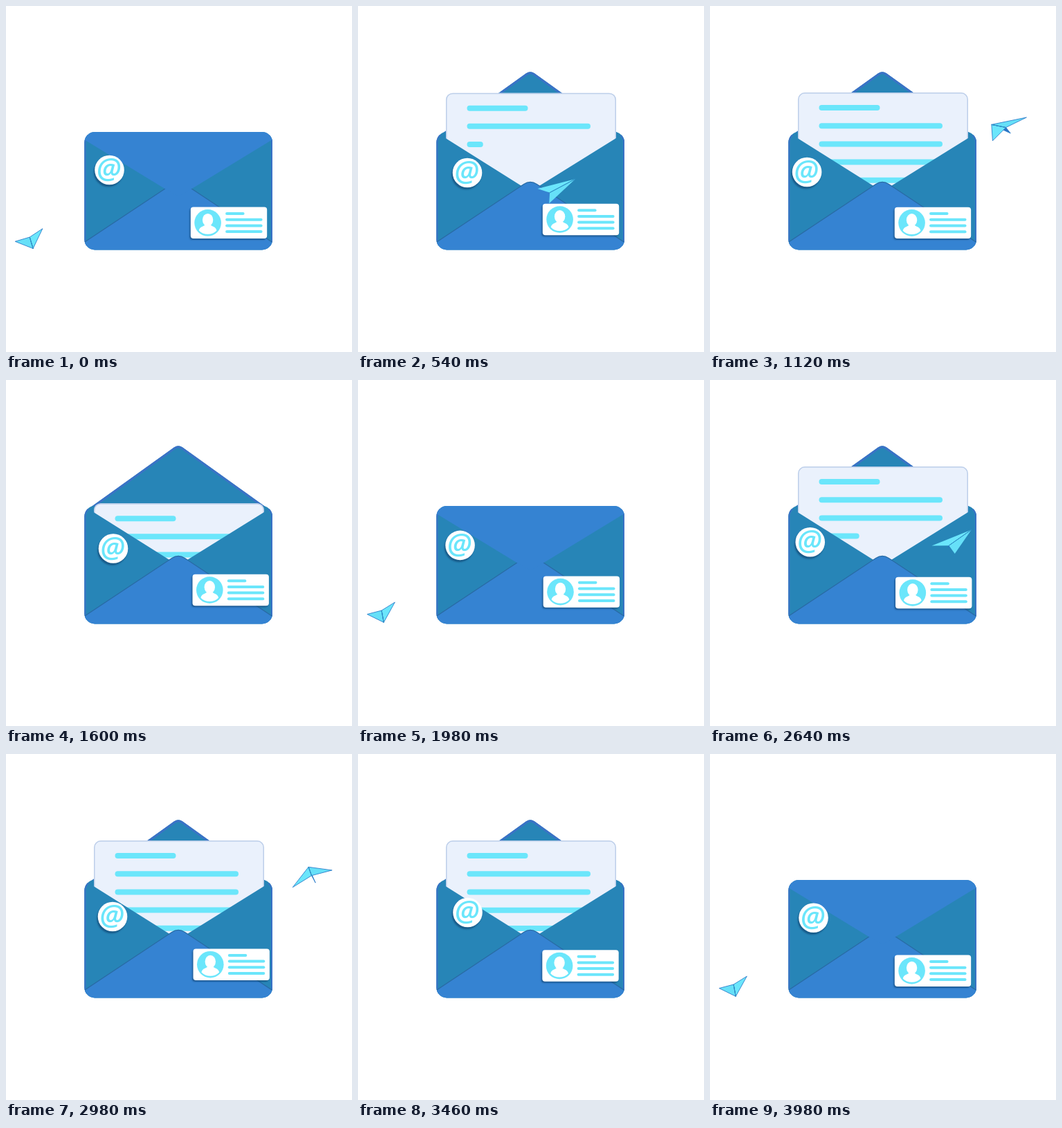
Animation of 500x500 px, one loop 4 s. Source, as an HTML page with a canvas:

```html
<!DOCTYPE html>
<html lang="en">
<head>
<meta charset="utf-8">
<title>Mail</title>
<style>
  html, body { margin: 0; width: 100%; height: 100%; overflow: hidden; background: #fff; }
  canvas { display: block; width: 100vw; height: 100vh; }
</style>
</head>
<body>
<canvas id="stage" width="500" height="500"></canvas>
<script>
const ctx = document.getElementById('stage').getContext('2d');
const LOOP = 4000, CYCLE = 2000;
const BLUE = '#3583d2', EDGE = '#3a72c6', TEAL = '#2785b7', CYAN = '#6be6fb';
const PAPER = '#eaf1fc', SHADE = 'rgba(15,65,110,0.6)';

// Drift of the stickers: time, badge x, y, card x, y
const drift = [
  [0, 149.5, 237, 322, 313.3],
  [540, 158, 241, 322, 308.5],
  [1140, 140, 240, 322, 313.3],
  [1600, 155, 243.5, 324.7, 303.5],
  [2360, 140, 234, 321.3, 309.5],
  [2980, 154, 235, 325.7, 304.2],
  [3460, 158.5, 229, 321.5, 306]
];

const clamp = v => Math.max(0, Math.min(1, v));
const span = (t, a, d) => clamp((t - a) / d);

// Smooth looping curve through the keys
function track(keys, t, period) {
  const n = keys.length;
  const at = i => {
    const turn = Math.floor(i / n), k = keys[i - turn * n];
    return { t: k[0] + turn * period, v: k };
  };
  let i = n - 1;
  while (keys[i][0] > t) i--;
  const [p, a, b, q] = [at(i - 1), at(i), at(i + 1), at(i + 2)];
  const d = b.t - a.t, u = (t - a.t) / d, u2 = u * u, u3 = u2 * u;
  return a.v.slice(1).map((x, j) => {
    const y = b.v[j + 1];
    const m = (y - p.v[j + 1]) / (b.t - p.t) * d;
    const k = (q.v[j + 1] - x) / (q.t - a.t) * d;
    return x * (2 * u3 - 3 * u2 + 1) + m * (u3 - 2 * u2 + u) + y * (3 * u2 - 2 * u3) + k * (u3 - u2);
  });
}

function trace(...pts) {
  pts.forEach(([x, y], i) => i ? ctx.lineTo(x, y) : ctx.moveTo(x, y));
  ctx.closePath();
}

function fill(color) {
  ctx.fillStyle = color;
  ctx.fill();
}

function stroke(color, width) {
  ctx.strokeStyle = color;
  ctx.lineWidth = width;
  ctx.stroke();
}

function box(x, y, w, h, r) {
  ctx.beginPath();
  ctx.roundRect(x, y, w, h, r);
}

function bar(x, y, len, thick) {
  box(x, y - thick / 2, len, thick, thick / 2);
  fill(CYAN);
}

function shadow(dx, dy, blur) {
  ctx.shadowColor = SHADE;
  ctx.shadowOffsetX = dx;
  ctx.shadowOffsetY = dy;
  ctx.shadowBlur = blur;
}

// Triangle with a rounded peak at x = 249
function peak(base, top, half, round) {
  const slope = (base - top) / half;
  ctx.beginPath();
  ctx.moveTo(249 - half, base);
  ctx.lineTo(249 - round, top + slope * round);
  ctx.quadraticCurveTo(249, top, 249 + round, top + slope * round);
  ctx.lineTo(249 + half, base);
}

const bodyPath = () => box(113.4, 182, 271.6, 170.5, 15);

function openFlap(s) {
  ctx.save();
  peak(188, 188 - 95 * s, 132.5, 6);
  ctx.closePath();
  fill(TEAL);
  ctx.clip();
  stroke(EDGE, 6);
  ctx.restore();
}

function closedFlap(s) {
  ctx.save();
  bodyPath();
  ctx.clip();
  peak(188 + 5 * s, 188 + 88 * s, 136, 6);
  ctx.lineTo(385, 182);
  ctx.lineTo(113, 182);
  fill(BLUE);
  ctx.restore();
}

function paper(t) {
  const drop = t < 1000
    ? 140 * (1 - span(t, 236, 364)) ** 3
    : 140 * span(t, 1440, 221) ** 3;
  const y = 125 + drop;
  if (y > 262) return;
  ctx.save();
  box(127, y, 246, 340 - y, [10, 10, 0, 0]);
  fill(PAPER);
  ctx.clip();
  stroke('#bccee9', 3);
  for (let i = 0; i < 5; i++) {
    const w = (i ? 178.5 : 88) * span(t, 364 + 82 * i, 92);
    if (w > 0) bar(157.5, y + 22 + 26.2 * i, Math.max(8, w), 8);
  }
  ctx.restore();
}

function front() {
  ctx.save();
  bodyPath();
  ctx.clip();
  ctx.save();
  ctx.beginPath();
  trace([113, 182.4], [249, 268], [113, 348]);
  trace([385, 183.4], [249, 268], [385, 348]);
  fill(TEAL);
  ctx.clip();
  bodyPath();
  stroke(EDGE, 4);
  ctx.restore();
  peak(342, 252, 135.5, 9);
  stroke('#286ba5', 2.6);
  ctx.lineTo(385, 353);
  ctx.lineTo(113, 353);
  fill(BLUE);
  ctx.restore();
}

function badge(x, y) {
  ctx.save();
  ctx.translate(x, y);
  shadow(-1.5, 3, 2);
  ctx.beginPath();
  ctx.arc(0, 0, 21.3, 0, 7);
  fill('#fff');
  shadow(0, 0, 0);
  ctx.font = 'italic 600 41px "Open Sans", sans-serif';
  ctx.fillStyle = CYAN;
  const m = ctx.measureText('@');
  ctx.fillText('@',
    (m.actualBoundingBoxLeft - m.actualBoundingBoxRight) / 2,
    (m.actualBoundingBoxAscent - m.actualBoundingBoxDescent) / 2);
  ctx.restore();
}

function card(x, y) {
  ctx.save();
  ctx.translate(x - 55.2, y - 22.7);
  shadow(-1.5, 2, 2);
  box(0, 0, 110.4, 45.4, 4);
  fill('#fff');
  shadow(0, 0, 0);
  ctx.beginPath();
  ctx.arc(24.8, 22.7, 19.3, 0, 7);
  fill(CYAN);
  ctx.beginPath();
  ctx.ellipse(24.8, 18.5, 7.7, 9.2, 0, 0, 7);
  fill('#fff');
  ctx.beginPath();
  ctx.moveTo(21, 24);
  ctx.bezierCurveTo(21, 29, 13, 27, 12, 34);
  ctx.bezierCurveTo(18, 41, 31.6, 41, 37.6, 34);
  ctx.bezierCurveTo(36.6, 27, 28.6, 29, 28.6, 24);
  fill('#fff');
  for (let i = 0; i < 4; i++) bar(50.3, 9.4 + 8.7 * i, i ? 53.5 : 27.5, 4);
  ctx.restore();
}

// The plane circles on a tilted orbit; its pose follows the orbit's tangent
function plane(t) {
  const a = 2 * Math.PI * t / CYCLE, cos = Math.cos(a), sin = Math.sin(a);
  const size = 0.92 - 0.16 * cos + 0.12 * sin * sin;
  const swing = cos + 0.083 * Math.sin(2 * a) * sin;
  const x = 238 - 205 * swing;
  const y = 255 + 76 * swing + 18 * sin + 13 * sin * sin;

  // Mix of the long and the foreshortened axis of the orbit
  const axis = (p, q, len) => [(-0.9 * p + 0.16 * q) * len * size, (0.42 * p + 0.4 * q) * len * size];
  const [nx, ny] = axis(-sin, cos, 50);
  const [wx, wy] = axis(cos, sin, 29);
  const dip = 8 * size * cos * cos;

  const nose = [x + nx, y + ny + 0.7 * dip];
  const left = [x - wx, y - wy], right = [x + wx, y + wy];
  const fold = [x + 0.2 * nx, y + 0.2 * ny];
  const keel = [x + 0.12 * nx + 0.6 * dip, y + 0.12 * ny + dip];
  const outside = x < 105 || x > 395;

  ctx.lineJoin = 'round';
  [['#2b72c4', keel], [CYAN, left], ['#66e0f8', right]].forEach(([color, tip]) => {
    ctx.beginPath();
    trace(nose, tip, fold);
    fill(color);
    if (outside) stroke('#2f7fcb', 0.9);
  });
  ctx.beginPath();
  trace(nose, fold);
  stroke('#2f8fc6', 0.9);
}

function flapScale(t) {
  const u = t < 1000 ? 1 - span(t, 0, 320) : span(t, 1640, 340);
  return Math.cos(Math.PI * u);
}

function draw(now) {
  const t = now % LOOP, c = t % CYCLE, s = flapScale(c);
  const [bx, by, cx, cy] = track(drift, t, LOOP);
  ctx.fillStyle = '#fff';
  ctx.fillRect(0, 0, 500, 500);
  if (c >= 1000) plane(c);
  if (s > 0) openFlap(s);
  bodyPath();
  fill(TEAL);
  paper(c);
  front();
  if (s <= 0) closedFlap(-s);
  card(cx, cy);
  badge(bx, by);
  if (c < 1000) plane(c);
}

let begin = null;
function tick(now) {
  if (begin === null) begin = now;
  draw(now - begin);
  requestAnimationFrame(tick);
}
draw(0);
requestAnimationFrame(tick);
</script>
</body>
</html>
```
